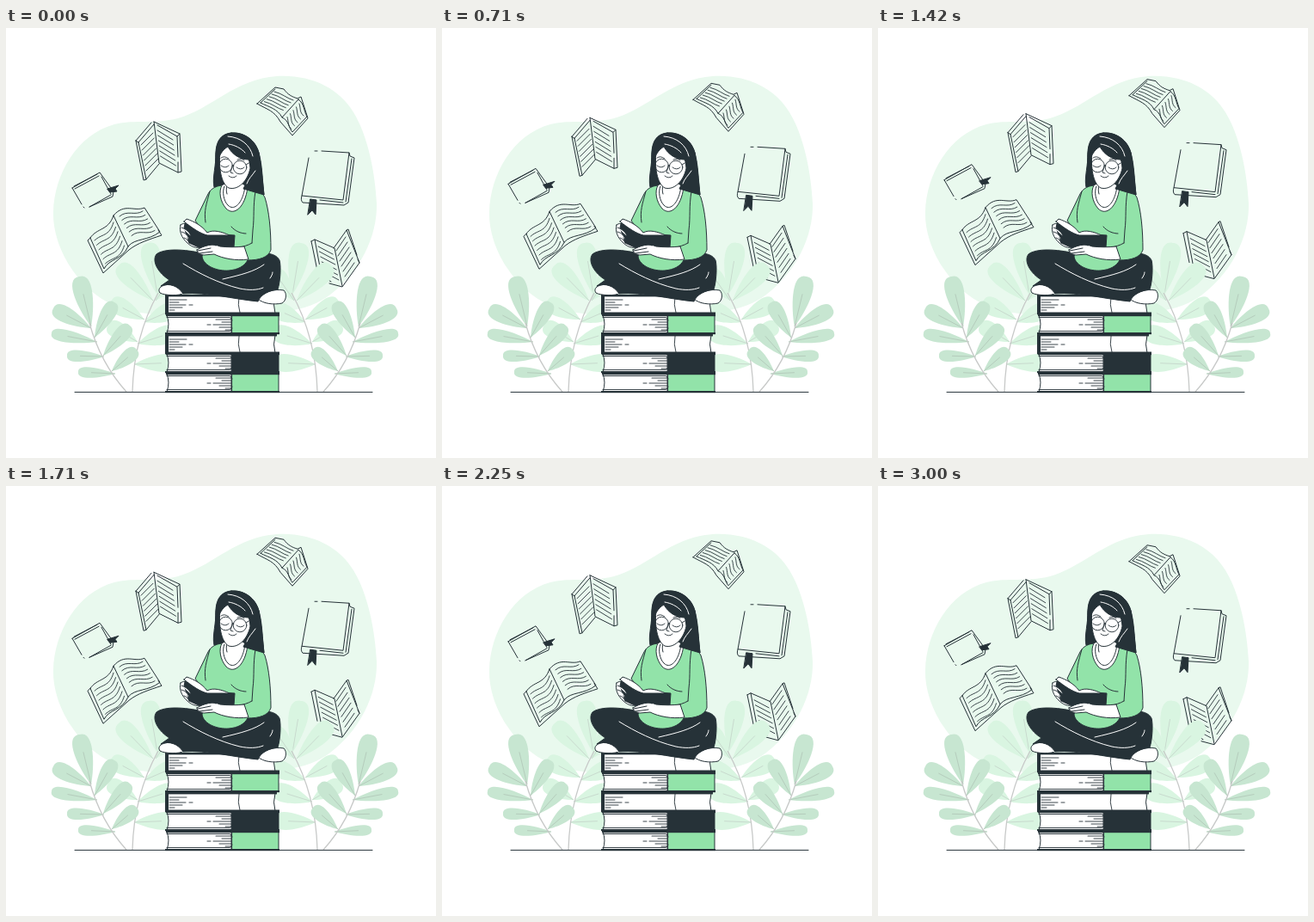
Write an HTML page that moves like this. It is 500 px wide and 500 px high and loops after 3040 ms.

```html
<!DOCTYPE html>
<html lang="en">
<head>
<meta charset="utf-8">
<title>Reading</title>
<style>
html, body { margin: 0; width: 100%; height: 100%; overflow: hidden; background: #fff }
svg { display: block; width: 100vw; height: 100vh }
.ink { fill: none; stroke: #263238; stroke-width: 1; stroke-linecap: round; stroke-linejoin: round }
.thin { stroke-width: .9 }
.dark { fill: #263238 }
.green { fill: #92e3a9 }
.white { fill: #fff }
.shine { stroke: #fff }
</style>
</head>
<body>
<svg viewBox="0 0 500 500">
  <path fill="#e9f9ee" d="M55 214C56 171 82 124 126 112C151 106 172 112 200 105C239 94 267 59 315 56C355 54 387 70 404 98C420 124 429 165 431 204C432 243 411 284 377 310C350 331 310 333 260 333C210 333 169 337 135 326C90 312 54 260 55 214Z"/>

  <g id="books" class="ink">
    <!-- open book, upper right -->
    <path d="M292 88L313 69L323 71C328 78 333 80 339 82L343 80L351 105L333 125L319 109C312 96 304 95 292 88ZM296 87C306 92 316 94 321 104L340 83M313 71L296 87M321 104C329 107 329 117 333 121L350 103C346 96 347 88 340 83"/>
    <!-- standing open book, upper left -->
    <path d="M151 131L169 110M151 131L160 177L163 176L178 158M154 133L163 176M154 133L172 112M151 131L154 133M172 109L202 123L204 167L200 168L178 157L172 109M176 113L199 126L200 150M199 126L202 123M200 156V168"/>
    <!-- closed book, left -->
    <path d="M77 186L109 168L125 190M80 187L108 172M79 184L106 170M77 186L88 205M90 208L91 209M97 208L124 196L125 190M111 173L122 193M97 208L122 194"/>
    <path class="dark" d="M118 187L131 183L127 187L129 190L121 191Z"/>
    <!-- open book, lower left -->
    <path d="M98 244L95 247L113 285L143 258C153 250 166 246 181 241L177 235M98 244L114 280C120 268 135 270 142 254C150 244 165 248 179 237L161 209C149 214 138 203 125 218C119 236 106 232 98 244M125 218L142 254"/>
    <!-- closed book, right -->
    <path d="M359 143H362M367 143L399 145L392 200L344 195L352 151M399 145L400 149L405 151L398 203L393 206L345 203C343 201 343 198 344 195M402 152L395 202M365 200L392 203"/>
    <path class="dark" d="M354 199L361 200L360 217L356 212L351 217Z"/>
    <!-- standing open book, lower right -->
    <path d="M355 248L362 282M355 248L359 246L382 256L391 300M359 246L366 283M376 297L391 301L411 273L396 235L381 256M396 235L398 234L408 264M409 269L411 273M366 288L378 295"/>
  </g>

  <g id="plants"></g>
  <path class="ink" d="M80 423.4H426"/>
  <g id="stack"></g>

  <g id="reader" class="ink">
    <path class="dark" d="M262 122C249 123 243 133 244 151C243 165 240 176 242 185L262 192L300 194C298 176 298 160 294 145C290 130 277 121 262 122Z"/>
    <!-- legs and shoes -->
    <path class="white" d="M180 301C189 295 203 300 207 308C202 312 184 311 179 308C177 305 178 303 180 301ZM293 315C299 307 312 303 323 305C327 309 326 317 321 320C312 322 299 321 293 315Z"/>
    <path class="dark" d="M229 262C207 257 184 256 175 263C169 271 177 285 190 293L180 300C190 296 200 300 206 309C234 307 263 315 293 318C296 310 306 305 316 304C319 295 320 277 318 270C313 260 296 261 285 264Z"/>
    <path class="shine" d="M206 274C224 285 247 297 272 303C282 305 292 305 299 302M252 292C274 287 289 283 300 275M307 291C309 288 310 286 310 284"/>
    <!-- sweater -->
    <path class="green" d="M251 183C242 184 237 188 234 195L220 224L232 240L228 266C230 277 246 283 259 282C270 281 277 277 281 270C294 270 305 267 308 258C308 235 306 213 301 197C297 189 289 186 280 184Z"/>
    <path d="M237 190C233 205 230 212 232 226M290 190C287 208 289 219 287 235L286 250M262 231C266 236 273 239 279 239M286 250C281 253 276 254 272 255"/>
    <!-- neck and face -->
    <path class="white" d="M251 183C247 190 249 202 256 210C265 219 278 209 281 185L275 181L257 180Z"/>
    <path d="M254 184C251 190 253 201 258 206C266 214 276 202 278 184M257 182C256 187 256 190 257 193"/>
    <path class="white" d="M249 144C247 162 250 181 259 186C270 189 281 178 284 163L282 145L259 134Z"/>
    <path class="dark" d="M244 162C247 149 251 142 258 138C263 147 272 153 282 153C285 159 287 164 290 164C287 174 279 179 276 187L300 194C298 176 297 160 294 145C288 126 270 118 255 124C244 130 243 147 244 162Z"/>
    <path class="shine" d="M258 126C273 127 284 136 287 149M259 135C266 136 274 140 278 145M290 166C286 172 282 175 280 181"/>
    <g class="thin">
      <circle cx="255.5" cy="160" r="7.8"/><circle cx="272" cy="162" r="7.8"/>
      <path d="M263 160Q264 159 265 160M279 159L284 156M250 160Q255 164 259 160M268 162Q273 166 277 162M250 151Q254 148 259 152M269 153Q274 151 277 154M263 161L261 168L264 169M259 172Q264 176 268 172"/>
    </g>
    <!-- held book and hands -->
    <path class="white" d="M203 229C208 225 213 229 216 235L219 247L228 252C225 258 216 255 211 250C204 244 201 236 203 229Z"/>
    <path class="dark" d="M209 224L207 232L213 250L235 260L265 255L266 241L234 239Z"/>
    <path class="white" d="M207 225L210 222C219 225 228 230 234 238C241 234 251 237 260 241L234 241C226 239 217 233 207 225Z"/>
    <path class="white" d="M204 232C210 234 214 238 215 242M204 237C209 238 212 242 213 246M207 244Q211 245 213 250"/>
    <path class="white" d="M222 258C230 253 241 250 249 254C258 255 268 255 277 254L282 269C267 271 252 268 242 263L230 264C225 263 222 261 222 258Z"/>
    <path d="M223 259L238 256M225 262L240 260M244 253L238 250"/>
  </g>
</svg>
<script>
const $ = id => document.getElementById(id);
const path = (d, attrs) => `<path d="${d}" ${attrs}/>`;
const repeat = (d, n, dx, dy) => Array.from({ length: n }, (_, i) =>
  path(d, `class="thin" transform="translate(${i * dx} ${i * dy})"`)).join('');

// Printed lines on the open pages
$('books').insertAdjacentHTML('beforeend',
  repeat('M312 74C321 76 327 82 334 84', 5, -2.9, 2.9) +
  repeat('M341 88C343 94 341 98 346 102', 5, -3.5, 3.9) +
  repeat('M157 136L171 122', 6, 1.2, 6) +
  repeat('M176 119L194 130', 6, .7, 6) +
  repeat('M103 247C111 239 120 243 125 226', 6, 2.5, 5.4) +
  repeat('M132 219C141 211 150 219 159 213', 6, 2.8, 4.5) +
  repeat('M363 254L380 263', 6, 1.4, 6) +
  repeat('M384 259L395 243', 6, 2, 6));

// A leaf grows from its base to a rounded tip, w wide
function leaf([x, y, tx, ty, w], fill, vein) {
  const dx = tx - x, dy = ty - y, len = Math.hypot(dx, dy);
  const at = (k, side) => `${x + dx * k - dy / len * w * side} ${y + dy * k + dx / len * w * side}`;
  return path(`M${x} ${y}C${at(.35, .45)} ${at(1.03, .9)} ${tx} ${ty}C${at(1.03, -.9)} ${at(.35, -.45)} ${x} ${y}Z`, `fill="${fill}"`) +
    path(`M${x} ${y}L${at(.65, 0)}`, `fill="none" stroke="${vein}"`);
}
const plant = (leaves, fill, vein, stem) =>
  leaves.map(l => leaf(l, fill, vein)).join('') +
  path(stem, 'fill="none" stroke="#c7c9c8" stroke-width="1.3"');

const side = plant([
  [176, 310, 166, 250, 22], [171, 317, 131, 276, 21], [161, 339, 122, 318, 20],
  [153, 365, 119, 345, 19], [174, 317, 198, 282, 20], [161, 342, 198, 326, 20],
  [153, 367, 198, 353, 21], [149, 391, 198, 389, 20]
], '#d9f5e1', '#c8dace', 'M147 423C148 382 157 344 177 308') + plant([
  [99, 347, 85, 289, 21], [99, 349, 55, 326, 18], [106, 365, 53, 355, 14],
  [114, 382, 71, 381, 13], [127, 402, 84, 400, 12], [103, 360, 126, 319, 17],
  [113, 381, 144, 346, 17], [123, 399, 152, 374, 16]
], '#c7e6d1', '#b5ccbc', 'M140 423C121 402 106 376 97 343');
$('plants').innerHTML = side + `<g transform="matrix(-1 0 0 1 509 0)">${side}</g>`;

// Stacked books: wide cover facing left, or spine block on the right
const ink = 'class="ink"';
const rect = (x, y, w, h, cls) => `<rect x="${x}" y="${y}" width="${w}" height="${h}" class="${cls}"/>`;
function hollow(y) {
  return path(`M187 ${y}H313Q310 ${y + 11} 313 ${y + 21}H187Z`, 'class="ink white"') +
    rect(185, y, 4, 22, 'dark') + rect(185, y - 1, 130, 2.4, 'dark') + rect(185, y + 19.5, 133, 2.8, 'dark') +
    path(`M271 ${y + 1}Q269 ${y + 11} 272 ${y + 20}M190 ${y + 5}H210M190 ${y + 8}H201M190 ${y + 11}H209M213 ${y + 11}H217M190 ${y + 14}H205M190 ${y + 17}H196`, 'class="ink thin"');
}
function solid(y, fill) {
  return path(`M187 ${y}Q191 ${y + 10} 187 ${y + 21}H262V${y}Z`, 'class="ink white"') +
    rect(263, y, 54, 21, 'ink ' + fill) + rect(186, y - 1, 132, 2.2, 'dark') + rect(185, y + 20, 133, 2.2, 'dark') +
    path(`M244 ${y + 5}H262M251 ${y + 8}H262M234 ${y + 11}H238M241 ${y + 11}H262M248 ${y + 14}H262M255 ${y + 17}H262M187 ${y + 2.5}H260Q263 ${y + 3} 263 ${y + 6}M187 ${y + 18.5}H260Q263 ${y + 18} 263 ${y + 15}`, 'class="ink thin"');
}
$('stack').innerHTML = hollow(311) + solid(334, 'green') + hollow(357) + solid(379, 'dark') + solid(402, 'green');

// Books rise 10 units and sink back at constant speed
const LOOP = 3040, start = performance.now();
function draw() {
  const p = (performance.now() - start) % LOOP / LOOP;
  const rise = 10 * (1 - Math.abs(1 - 2 * p));
  $('books').setAttribute('transform', `translate(0 ${-rise})`);
  requestAnimationFrame(draw);
}
draw();
</script>
</body>
</html>
```
